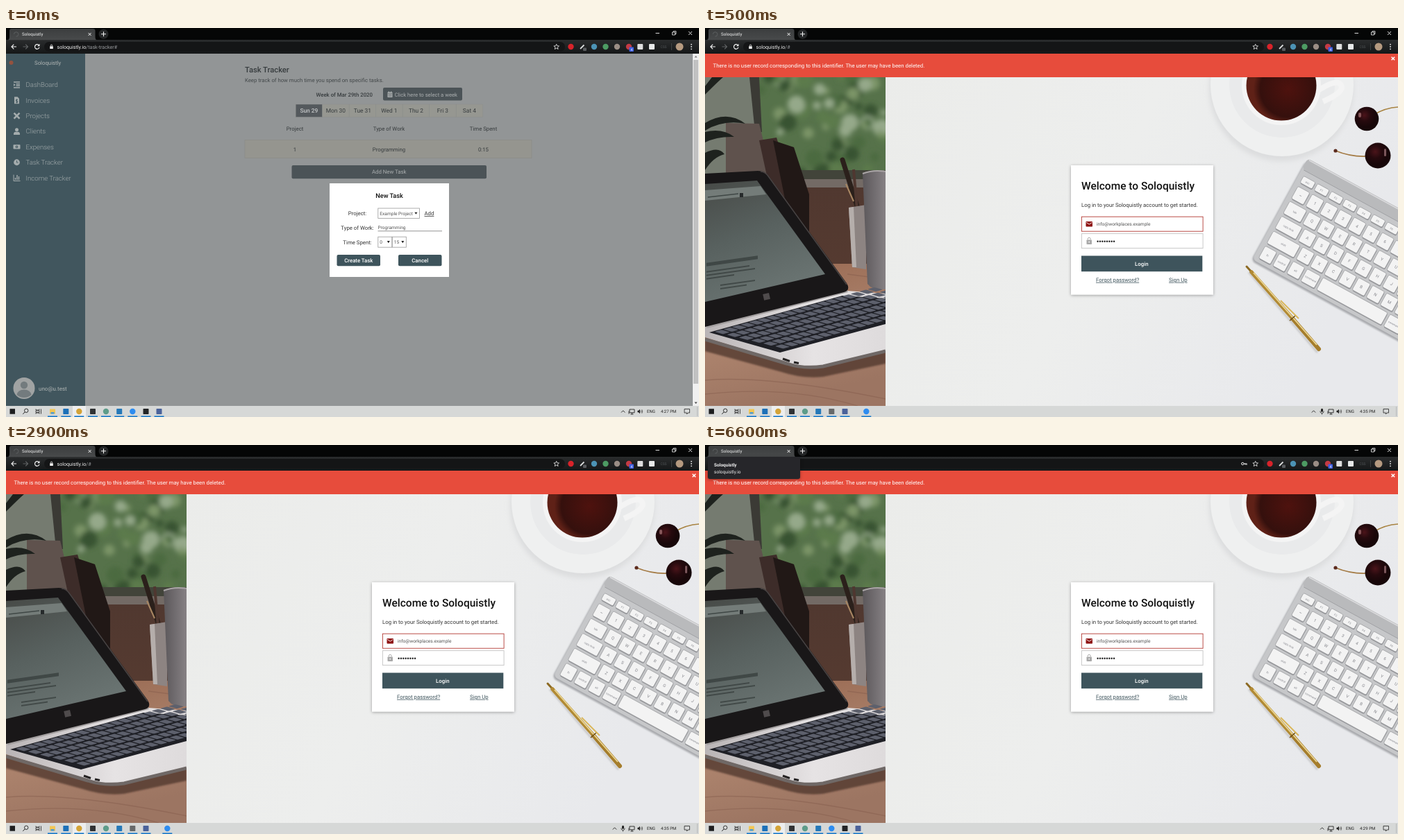
An HTML page for the animation above (8 s loop, 998 px wide and 561 px high).

```html
<!DOCTYPE html>
<html lang="en">
<head>
<meta charset="utf-8">
<title>Task tracker demo</title>
<style>
html, body { margin: 0; width: 100%; height: 100%; overflow: hidden; background: #000; }
svg { display: block; width: 998px; height: 561px; font-family: Roboto, "Open Sans", sans-serif; text-rendering: geometricPrecision; }
</style>
</head>
<body>
<svg id="stage" viewBox="0 0 998 561">
<defs>
  <linearGradient id="tab" x2="0" y2="1"><stop stop-color="#3c3e3f"/><stop offset="1" stop-color="#484a4b"/></linearGradient>
  <linearGradient id="toolbar" x2="0" y2="1"><stop stop-color="#2a2c2d"/><stop offset="1" stop-color="#151718"/></linearGradient>
  <linearGradient id="table" x2="1" y2=".3"><stop stop-color="#ebecea"/><stop offset=".5" stop-color="#edeeed"/><stop offset="1" stop-color="#e8e9ec"/></linearGradient>
  <linearGradient id="wall" x2="0" y2="1"><stop stop-color="#4a352f"/><stop offset="1" stop-color="#5d3e31"/></linearGradient>
  <linearGradient id="wood" x2=".3" y2="1"><stop stop-color="#96664e"/><stop offset=".6" stop-color="#ab826c"/><stop offset="1" stop-color="#9c7562"/></linearGradient>
  <linearGradient id="mug"><stop stop-color="#5b575a"/><stop offset="1" stop-color="#868184"/></linearGradient>
  <linearGradient id="screen" x2=".4" y2="1"><stop stop-color="#474a47"/><stop offset=".5" stop-color="#58615f"/><stop offset="1" stop-color="#6a7472"/></linearGradient>
  <linearGradient id="palm" x2="1"><stop stop-color="#b9b4b5"/><stop offset=".6" stop-color="#e6e3e4"/><stop offset="1" stop-color="#dedbdc"/></linearGradient>
  <radialGradient id="coffee" cx=".6" cy=".55"><stop stop-color="#4e120e"/><stop offset=".8" stop-color="#35100d"/><stop offset="1" stop-color="#5f2117"/></radialGradient>
  <radialGradient id="cherry" cx=".4" cy=".35"><stop stop-color="#4b141a"/><stop offset=".5" stop-color="#260a0e"/><stop offset="1" stop-color="#170709"/></radialGradient>
  <filter id="soft" x="-20%" y="-20%" width="140%" height="140%"><feGaussianBlur stdDeviation="3.5"/></filter>
  <filter id="haze" x="-20%" y="-20%" width="140%" height="140%"><feGaussianBlur stdDeviation="1"/></filter>
  <filter id="lift" x="-10%" y="-10%" width="120%" height="120%"><feDropShadow dx="0" dy="1" stdDeviation="2" flood-opacity=".35"/></filter>
  <clipPath id="deskClip"><rect y="71" width="260" height="474"/></clipPath>
  <clipPath id="tableClip"><rect x="260" y="71" width="738" height="474"/></clipPath>
  <clipPath id="windowClip"><rect x="76" y="71" width="184" height="148"/></clipPath>
</defs>
</svg>
<script>
const BRAND = 'Soloquistly', SITE = 'soloquistly.io', SLATE = '#3e545c';
const LOOP = 8000, CUTS = [0, 500, 4500];

const rect = (x, y, w, h, fill, more = '') => `<rect x="${x}" y="${y}" width="${w}" height="${h}" fill="${fill}" ${more}/>`;
const disc = (x, y, r, fill, more = '') => `<circle cx="${x}" cy="${y}" r="${r}" fill="${fill}" ${more}/>`;
const poly = (points, fill, more = '') => `<polygon points="${points}" fill="${fill}" ${more}/>`;
const line = (d, stroke, width = 1, more = '') => `<path d="${d}" fill="none" stroke="${stroke}" stroke-width="${width}" ${more}/>`;
const text = (x, y, size, fill, s, more = '') => `<text x="${x}" y="${y}" font-size="${size}" fill="${fill}" ${more}>${s}</text>`;
const mid = (x, y, size, fill, s, more = '') => text(x, y, size, fill, s, 'text-anchor="middle" ' + more);
const group = (content, more = '') => `<g ${more}>${content}</g>`;
const shown = (scenes, content) => group(content, `data-scenes="${scenes}"`);
const MEDIUM = 'font-weight="500"', UNDER = 'text-decoration="underline"';

function randomizer(seed) {
  return () => (seed = (seed * 16807) % 2147483647) / 2147483647;
}

function button(x, y, w, h, fill, label, ink = '#fff', weight = MEDIUM) {
  return rect(x, y, w, h, fill, 'rx="2"') + mid(x + w / 2, y + h / 2 + 2.8, 7.8, ink, label, weight);
}

function select(x, y, w, h, label) {
  return rect(x, y, w, h, '#fff', 'stroke="#999" stroke-width=".8"') +
    text(x + 2.5, y + h / 2 + 2.4, 6.6, '#555', label) +
    poly(`${x + w - 7},${y + h / 2 - 1.6} ${x + w - 3},${y + h / 2 - 1.6} ${x + w - 5},${y + h / 2 + 1.6}`, '#222');
}

function sidebar() {
  const ink = '#a4acad', d = (s, w = 1.4) => line(s, ink, w);
  const items = [
    ['DashBoard', d('M-4.5-4H4.5M-1-1.3H4.5M-1 1.3H4.5M-4.5 4H4.5') + poly('-4.5,-2 -2,0 -4.5,2', ink)],
    ['Invoices', poly('-3.5,-5 1,-5 3.5,-2.5 3.5,5 -3.5,5', ink) + line('M1.5-1H-1V1.2H1.2V3.2H-1.5M0-2V4', '#41565e', .8)],
    ['Projects', d('M-4-4L4 4M4-4L-4 4', 2.6)],
    ['Clients', disc(0, -2.3, 2.5, ink) + `<path d="M-4.5 5V3Q-4 .8-1.5.8H1.5Q4 .8 4.5 3V5Z" fill="${ink}"/>`],
    ['Expenses', rect(-5, -3.2, 10, 6.4, ink, 'rx=".8"') + disc(0, 0, 1.8, '#41565e') + d('M0-1V1', .9)],
    ['Task Tracker', disc(0, 0, 4.4, ink) + line('M0-2.6V.3H2', '#41565e', .9)],
    ['Income Tracker', d('M-4.5-4.5V4.4H5', 1) + d('M-2 3V0M.5 3V-4M3 3V-2', 1.4)]
  ];
  return rect(0, 37, 114, 508, '#41565e') + disc(7.5, 50, 3, '#94523f') + text(41, 53, 7.8, '#b1b6b5', BRAND) +
    items.map(([label, icon], i) => {
      const y = 82 + i * 22.35;
      return group(icon, `transform="translate(15.5 ${y})"`) + text(28.5, y + 3.4, 9.6, ink, label, 'font-weight="300"');
    }).join('') +
    disc(26, 519.5, 15.5, '#a0a3a3') + disc(26, 515, 5.2, '#737b7e') +
    '<path d="M15.5 529Q17 521.5 26 521.5T36.5 529Q32 533 26 533T15.5 529Z" fill="#737b7e"/>' +
    text(47, 522.6, 8, '#b1b6b5', 'uno@u.test');
}

function tracker() {
  const ink = '#373c3e', dark = '#4b5357', pale = '#abafb0';
  const days = ['Sun 29', 'Mon 30', 'Tue 31', 'Wed 1', 'Thu 2', 'Fri 3', 'Sat 4'];
  const columns = (y, labels) => labels.map((s, i) => mid([416, 551.5, 687.5][i], y, 7.8, ink, s)).join('');
  return rect(114, 37, 884, 508, '#929596') +
    text(344, 64, 11.2, ink, 'Task Tracker', MEDIUM) +
    text(344, 77.8, 7.75, '#44494b', 'Keep track of how much time you spend on specific tasks.') +
    text(446.5, 98.8, 7.8, ink, 'Week of Mar 29th 2020', MEDIUM) +
    rect(543, 86, 114, 18.5, dark, 'rx="2"') + text(559.5, 98.5, 7.7, pale, 'Click here to select a week') +
    rect(549.5, 92.5, 7, 7.5, pale, 'rx=".6"') + line('M551.3 91.3v2M554.7 91.3v2', pale, 1.1) +
    line('M549.5 94.6h7M550.5 96.4h5M550.5 98.3h5', dark, .6) +
    days.map((s, i) => rect(417.2 + i * 38.5, 110, 38.5, 18.5, i ? '#969791' : '#54595d', 'stroke="#8b8d8b" stroke-width=".5"') +
      mid(436.4 + i * 38.5, 122.2, 8.4, i ? ink : '#c3c6c7', s, i ? '' : MEDIUM)).join('') +
    columns(148, ['Project', 'Type of Work', 'Time Spent']) +
    rect(344, 161.5, 413, 26, '#95958f', 'stroke="#8a8b87" stroke-width=".7"') + columns(177.6, ['1', 'Programming', '0:15']) +
    button(411.5, 198, 280.5, 19.3, dark, 'Add New Task', pale, '') +
    rect(989, 37, 9, 508, '#f0f0f0') + rect(990, 46, 7, 467, '#c1c1c1') +
    poly('991.5,42.5 995.5,42.5 993.5,40', '#777') + poly('991.5,539.5 995.5,539.5 993.5,542', '#444');
}

function taskModal() {
  const ink = '#333';
  return rect(466, 224, 172, 135, '#fff') + mid(552, 245.2, 9.2, '#111', 'New Task', MEDIUM) +
    mid(506, 270, 7.8, ink, 'Project:') + mid(506, 290.8, 7.8, ink, 'Type of Work:') + mid(506, 311.7, 7.8, ink, 'Time Spent:') +
    select(535.8, 260, 59.6, 14.5, 'Example Project') + text(602.5, 270, 7.8, ink, 'Add', UNDER) +
    text(535.5, 290, 6.6, '#555', 'Programming') + line('M535.5 292.8H628', '#777', .8) +
    select(535.8, 301.2, 20, 15, '0') + select(556.3, 301.2, 20, 15, '15') +
    button(476.5, 327, 62.5, 16.3, SLATE, 'Create Task') + button(565, 327, 62.5, 16.3, SLATE, 'Cancel');
}

function laptopDesk() {
  const rnd = randomizer(77);
  const greens = ['#4c6a3f', '#7b9468', '#385330', '#95a98a', '#5c7a4c'];
  let leaves = '', keys = '';
  for (let i = 0; i < 70; i++) leaves += disc(80 + rnd() * 180, 70 + rnd() * 140, 4 + rnd() * 9, greens[i % 5]);
  for (let r = 0; r < 6; r++) for (let c = 0; c < 19; c++)
    keys += rect(c * 13 + r * 1.5, r * 13.5, 10.6, 10.2, '#5d606c', 'rx="1.5"');
  const bars = [[2, 0, 74, 5], [2, 12, 62, 2], [2, 17, 70, 2], [2, 22, 40, 2], [22, 34, 50, 2], [22, 39, 38, 2]];
  return rect(0, 71, 260, 474, 'url(#wall)') + rect(0, 71, 80, 140, '#757b70') +
    group(rect(70, 65, 200, 160, '#56724a') + group(leaves, 'filter="url(#soft)"'), 'clip-path="url(#windowClip)"') +
    poly('64,71 78,71 82,150 72,150', '#3b3a35') + rect(130, 205, 130, 14, '#42443a') + rect(130, 218, 130, 12, '#736a65') +
    poly('30,137 78,138 118,300 30,300', '#5f524d') + poly('78,162 103,158 150,310 110,310', '#3d2c29') +
    poly('98,162 128,172 150,240 150,330 130,320', '#211816') +
    `<path d="M0 137Q32 118 58 138Q26 132 0 148ZM0 96Q20 76 26 71H10L0 84ZM0 180Q20 170 28 182Q12 186 0 205ZM0 150Q25 144 42 157Q18 156 0 165Z" fill="#1e221e"/>` +
    rect(0, 340, 260, 205, 'url(#wood)') +
    line('M0 508Q90 500 260 535M0 528Q120 515 220 545M205 355L260 362', '#80594a', 1.3, 'opacity=".45"') +
    line('M198 190L220 260', '#2b201b', 7, 'stroke-linecap="round"') + line('M214 204L219 262', '#4f3730', 4) + line('M203 225L214 250', '#a98763', 2) +
    poly('207,259 232,255 232,348 212,345', '#8d8482') + poly('207,259 214,258 218,345 212,345', '#b5aeab') +
    '<path d="M227 209Q245 203 260 206V377Q240 378 234 369Z" fill="url(#mug)"/>' + line('M227 210Q243 204 260 207', '#aaa5a6', 2) +
    '<path d="M0 450L118 484Q142 493 170 488L260 466V484L170 503Q140 506 110 496L0 466Z" fill="#3f2a24" opacity=".65" filter="url(#haze)"/>' +
    '<path d="M0 430L205 379L260 383V466L170 487Q142 491 118 483L0 446Z" fill="url(#palm)"/>' +
    line('M0 449L118 484Q142 492 170 488L260 466', '#6f6866', 5) +
    line('M112 477l10 3.500M128 482l7 1.500', '#252222', 3) +
    poly('6,439 198,386 260,390 260,427 108,468', '#1f2026') + group(keys, 'transform="matrix(.94 -.262 1.18 .34 14 438)"') +
    line('M2 430L205 378', '#a5a1a1', 6) +
    '<path d="M0 210L76 206Q87 206 92 214L204 368Q210 378 200 381L0 431Z" fill="#191718"/>' +
    line('M80 207Q87 207 92 215L204 370', '#484343', 1.5) +
    poly('0,225 75,220 173,355 0,395', 'url(#screen)') + poly('0,234 80,228 88,240 0,249', '#747c79') +
    line('M4 244L48 239', '#3f4745', 1.5) + rect(50, 238, 5, 6, '#262a2b') +
    group(bars.map(([x, y, w, h]) => rect(x, y, w, h, '#343b39', 'opacity=".7"')).join(''), 'transform="translate(0 339) skewY(-8)"') +
    rect(84, 383, 9, 9, '#4f4b4c', 'transform="rotate(-13 88 387)"');
}

function keyboard() {
  const key = (x, y, w, h, label = '') => rect(x + .8, y + 1.2, w, h, '#8e8f93', 'rx="2.2"') +
    rect(x, y, w, h, '#f3f3f3', 'rx="2.2" stroke="#9a9b9e" stroke-width=".7"') +
    mid(x + w / 2, y + h / 2 + 2, label.length > 1 ? 4 : 6, '#85868c', label);
  const row = (y, first, label, letters) => key(7, y, first, 20, label) +
    [...letters].map((s, i) => key(11 + first + i * 23, y, 19.5, 20, s)).join('');
  let keys = '';
  for (let i = 0; i < 11; i++) keys += key(7 + i * 23, 25, 19.5, 11, i ? 'F' + i : 'esc');
  keys += row(42, 19.5, '~', '1234567890') + row(66.5, 28, 'tab', 'QWERTYUIOP') +
    row(91, 34, 'caps lock', 'ASDFGHJKL;') + row(115.5, 44, 'shift', 'ZXCVBNM,.');
  [[7, 19, 'fn'], [30, 19, 'control'], [53, 19, 'alt'], [76, 22, 'command'], [102, 106, ''], [212, 24, 'command'], [240, 20, 'alt']]
    .forEach(([x, w, s]) => keys += key(x, 140, w, 20, s));
  return group(rect(-1, 4, 330, 165, '#a9aaae', 'rx="7" filter="url(#haze)"') + rect(0, 0, 330, 166, '#c6c7c9', 'rx="6"') +
    rect(0, 0, 330, 17, '#b9babc', 'rx="5"') + line('M3 1.5H330', '#dcdcde', 1.5) + line('M3 17.5H330', '#98999d', .8) + keys,
    'transform="translate(868 188) rotate(28.7)"');
}

function tableTop() {
  return rect(260, 71, 738, 474, 'url(#table)') +
    disc(830, 88, 104, '#dcddde', 'filter="url(#soft)"') + disc(831, 82, 103, '#eff0f0') + disc(831, 82, 76, '#e9eaeb') +
    line('M880 92Q910 72 916 82T890 106', '#f4f4f4', 8) +
    disc(830, 83, 57, '#f4f4f4') + disc(830, 83, 50.5, 'url(#coffee)') +
    line('M963 125Q980 115 998 114', '#a88341', 1.6) + line('M953 185Q930 186 908 177', '#a37942', 1.6) + disc(908, 177, 2.6, '#5b2a1d') +
    disc(953, 131, 17.3, 'url(#cherry)') + disc(969, 184, 18.5, 'url(#cherry)') +
    rect(941, 122, 4, 7, '#c1898a', 'rx="2" opacity=".6"') + rect(978, 174, 3, 11, '#b98a90', 'rx="1.5" opacity=".6"') +
    keyboard() +
    line('M783 352L882 468', '#c9c9ca', 3, 'filter="url(#haze)"') +
    line('M780 344L790 355', '#8c6a23', 3, 'stroke-linecap="round"') +
    line('M787 352L848 421', '#b18a35', 5.5, 'stroke-linecap="round"') + line('M846 419L884 463', '#a57d2c', 6, 'stroke-linecap="round"') +
    line('M790 353L881 457', '#ecd793', 1.8) + line('M850 415l-8 7', '#6e4f15', 1.6) + line('M829 393L855 419', '#d9b75c', 2);
}

function login() {
  return rect(0, 37, 998, 34, '#e74c3c') +
    text(11.5, 57.2, 7.82, '#fff', 'There is no user record corresponding to this identifier. The user may have been deleted.') +
    line('M988.6 41.7l4.6 4.6M993.2 41.7l-4.6 4.6', '#fff', 1.5) +
    rect(527, 198, 205, 186.5, '#fff', 'filter="url(#lift)"') +
    text(542, 232.6, 15.5, '#111', 'Welcome to ' + BRAND, MEDIUM) +
    text(542, 258, 7.8, '#333', `Log in to your ${BRAND} account to get started.`) +
    rect(542.4, 272.2, 174.7, 21, '#fff', 'stroke="#b23a34" stroke-width=".9"') +
    rect(548.5, 279, 9.5, 7.6, '#8f1414', 'rx=".8"') + line('M549.2 280.4l4.1 2.7l4.1-2.7', '#fff', .9) +
    text(564, 285.2, 6.6, '#555', 'info@workplaces.example') +
    rect(542.4, 296.6, 174.7, 21, '#fff', 'stroke="#c4c4c4" stroke-width=".9"') +
    rect(549.5, 305.5, 7.5, 6.5, '#aaa', 'rx=".8"') + line('M551.2 305.5v-1.2a2 2 0 0 1 4 0v1.2', '#aaa', 1) + disc(553.2, 308.6, .9, '#fff') +
    Array.from({ length: 8 }, (_, i) => disc(565.6 + i * 3.35, 307.8, 1.2, '#222')).join('') +
    rect(542, 328.5, 174.3, 22.7, SLATE) + mid(628.8, 342.7, 7.8, '#fff', 'Login', MEDIUM) +
    text(563, 365.8, 7.8, SLATE, 'Forgot password?', UNDER) + text(668, 365.8, 7.8, SLATE, 'Sign Up', UNDER);
}

function browser() {
  const white = '#f1f1f1';
  const extensions = [[813.5, '#d8232a'], [847, '#4c93b5'], [863.5, '#4d9b63'], [880, '#9a8d85'], [897, '#c43a44']];
  const address = path => text(73.5, 29.6, 7.15, white, `${SITE}<tspan fill="#9a9c9f">${path}</tspan>`);
  return rect(0, 0, 998, 18, '#050606') + rect(0, 17, 998, 20, 'url(#toolbar)') + rect(55, 20, 750, 14, '#141516', 'rx="7"') +
    '<path d="M2 17.3Q5 17 5 13V4Q5 1 8 1H125Q128.5 1 128.5 4V13Q128.5 17 131 17.3Z" fill="url(#tab)"/>' +
    line('M11.5 9a3.2 3.2 0 1 1 3 3.2', '#5f6364', .9) + text(23, 11.1, 6.2, white, BRAND) +
    line('M118.6 7l4 4M122.6 7l-4 4', white, 1) + disc(140.5, 8.7, 7, '#242627') + line('M137 8.7h7M140.5 5.2v7', white, 1.1) +
    line('M935.5 7.5h5.5M983 5l5 5M988 5l-5 5', white, .9) + line('M959.5 6h4v4h-4zM961 6v-1.3h4v4h-1.3', white, .8) +
    line('M15 27H8M11.3 23.7L8 27l3.3 3.3', white, 1.2) + line('M24.5 27h7M28.2 23.7l3.3 3.3l-3.3 3.3', '#606364', 1.2) +
    line('M47.6 25.2a3.3 3.3 0 1 0 .4 2.7', white, 1.2) + poly('48.5,22.8 48.5,26.3 45.2,26.3', white) +
    rect(63.2, 26.3, 4.6, 3.8, white, 'rx=".4"') + line('M64.3 26.3v-1a1.2 1.2 0 0 1 2.4 0v1', white, .8) +
    shown('0', address('/task-tracker#')) + shown('1', address('/#')) +
    shown('2', disc(774.3, 27, 1.7, 'none', `stroke="${white}"`) + line('M776 27h4v1.8M778 27v1.5', white, 1.1)) +
    line('M792.7 23.3l1.1 2.5l2.7.2l-2.1 1.8l.7 2.7l-2.4-1.5l-2.4 1.5l.7-2.7l-2.1-1.8l2.7-.2z', white, .8) +
    extensions.map(([x, fill]) => disc(x, 27, 4.2, fill)).join('') +
    line('M827 30l5.5-5.5', '#d9dcdc', 1.8) + rect(831, 28.5, 5, 4.5, '#5a5d60', 'rx="1"') +
    rect(897.5, 27.5, 6.5, 6.5, '#3f5fe0', 'rx="1"') + mid(900.8, 32.8, 5, '#fff', '4') +
    rect(909.3, 23, 8, 8, '#dedede', 'rx="1"') + rect(926, 23, 8, 8, '#e7e9e9', 'rx="1"') +
    mid(947, 29, 5, '#505456', 'CSS') + line('M958.5 22v10', '#505354', .7) + disc(970, 27, 5.5, '#b59a80') +
    [23.7, 27, 30.3].map(y => disc(987, y, .9, white)).join('') +
    shown('2', rect(4, 17, 133, 32, '#25282b', 'rx="3" filter="url(#lift)"') +
      text(13, 30.7, 6.5, white, BRAND, 'font-weight="700"') + text(13, 41, 6.6, white, SITE));
}

function taskbar() {
  const ink = '#222';
  const open = x => rect(x - 7, 559.4, 14, 1.6, '#1878c8');
  const app = (x, fill, round) => (round ? disc(x, 553, 4.2, fill) : rect(x - 4, 549, 8, 8, fill, 'rx=".8"')) + open(x);
  const clock = s => text(943, 555.4, 6.05, ink, s);
  const chevron = x => line(`M${x - 2.7} 554.5l2.7-2.7l2.7 2.7`, ink, .9);
  const usual = app(182.3, '#2d8cf0', true) + app(201.5, '#222426') + app(220.5, '#4a629a') + chevron(888.7);
  return rect(0, 545, 998, 16, '#d6d8d7') + rect(96, 545, 19, 16, '#edeeee') + rect(5.5, 549.2, 7.5, 7.5, '#1c1d1e') +
    disc(29.2, 551.8, 2.7, 'none', `stroke="${ink}" stroke-width=".9"`) + line('M27.3 553.8l-3 3', ink, 1) +
    line('M43 549.5v1.5h5v-1.5M43 556.5v-1.5h5v1.5M43 551.8h5v2.5h-5zM50.5 549.5v7', ink, .8) +
    rect(63, 549.5, 8, 7, '#f1c656', 'rx=".6"') + rect(64.5, 554, 5, 2.5, '#4a9ad6') + open(67) +
    app(86.3, '#1c70b8') + app(105.3, '#d4a336', true) + app(125, '#303234') + app(144, '#5d9c8a', true) + app(163.2, '#2478b8') +
    shown('0 2', usual) +
    shown('1', app(182.3, '#67696a') + app(201.5, '#4a629a') + app(232.3, '#2d8cf0', true) + chevron(876.5) +
      rect(887, 548.8, 3, 5, ink, 'rx="1.5"') + line('M885.8 552.5q0 3 2.7 3t2.7-3M888.5 555.5v2', ink, .8)) +
    line('M898 550h7v4.8h-7zM899.5 557h4M901.5 554.8v2M897 552.5v4', ink, .9) +
    poly('909.5,551.7 911,551.7 913,549.8 913,556.2 911,554.3 909.5,554.3', ink) + line('M914.3 551.5q1 1.5 0 3M915.8 550.3q1.8 2.7 0 5.4', ink, .7) +
    text(923, 555.4, 6.1, ink, 'ENG') + ['4:27 PM', '4:35 PM', '4:29 PM'].map((s, i) => shown(i, clock(s))).join('') +
    line('M977 549.5h7.5v5.5h-2.5l-1.5 1.8v-1.8h-3.5z', ink, .8) + line('M995.5 546v14', '#a5a7a7', .6);
}

const stage = document.getElementById('stage');
stage.insertAdjacentHTML('beforeend',
  shown('0', tracker() + sidebar() + taskModal()) +
  shown('1 2', group(tableTop(), 'clip-path="url(#tableClip)"') + group(laptopDesk(), 'clip-path="url(#deskClip)"') + login()) +
  browser() + taskbar());

for (const part of stage.querySelectorAll('[data-scenes]')) {
  const scenes = part.dataset.scenes.split(' ').map(Number);
  const steps = CUTS.map((at, i) => ({ offset: at / LOOP, opacity: scenes.includes(i) ? 1 : 0, easing: 'steps(1, end)' }));
  steps.push({ ...steps[steps.length - 1], offset: 1 });
  part.animate(steps, { duration: LOOP, iterations: Infinity });
}
</script>
</body>
</html>
```
